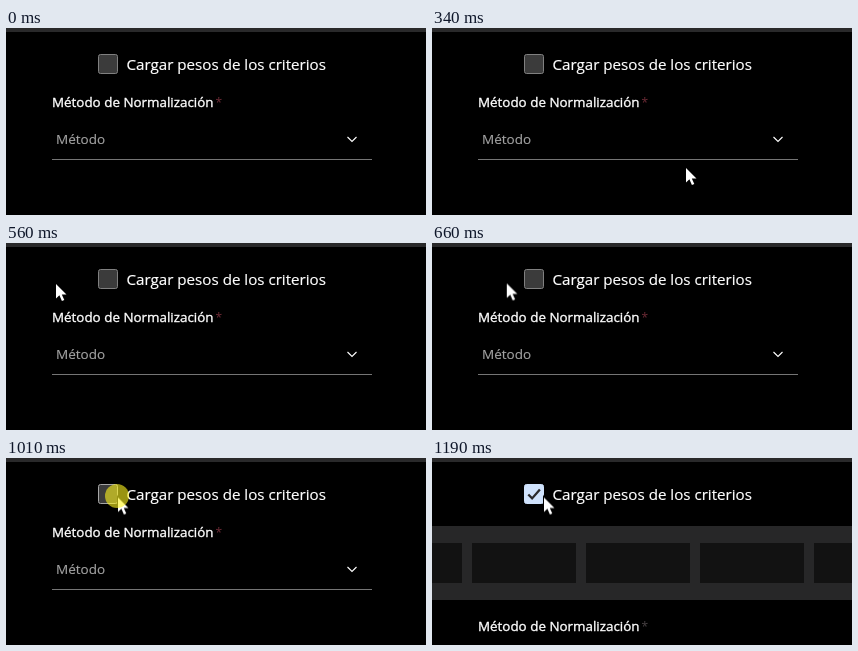
Recreate the animation shown at these times as an HTML page. Size 420 px wide and 187 px high, loop 2.42 s.

```html
<!DOCTYPE html>
<html lang="es">
<head>
<meta charset="utf-8">
<title>Cargar pesos de los criterios</title>
<style>
  html, body { margin: 0; width: 100%; height: 100%; overflow: hidden; background: #000; }
  svg { display: block; width: 420px; height: 187px; }
  text { font-family: "Open Sans", "Noto Sans", sans-serif; fill: #fff; }
  .title { font-size: 15.15px; stroke: #fff; stroke-width: .2px; }
  .label { font-size: 13.4px; stroke: #fff; stroke-width: .35px; }
  #star { fill: #6b2a34; font-size: 12px; }
  #hint { fill: #a3a3a3; font-size: 13.5px; stroke: #a3a3a3; stroke-width: .15px; }
  #panel, #tick, #click, #cursor { opacity: 0; }
</style>
</head>
<body>
<svg viewBox="0 0 420 187">
  <rect width="420" height="187"/>
  <rect width="420" height="4" fill="#29292a"/>

  <g id="panel">
    <rect y="68" width="420" height="74" fill="#272728"/>
    <g id="cells" fill="#121212"></g>
  </g>

  <g id="field">
    <text class="label" x="46" y="79">Método de Normalización</text>
    <text id="star" x="209.5" y="79">*</text>
    <text id="hint" x="50" y="116">Método</text>
    <path d="M341.5 109l4.5 4.5 4.5-4.5" fill="none" stroke="#fff" stroke-width="1.1"/>
    <rect x="46" y="131" width="320" height="1" fill="#757575"/>
  </g>

  <rect id="box" x="92.5" y="26.5" width="19" height="19" rx="2" fill="#3b3b3b" stroke="#808080"/>
  <path id="tick" d="M96.3 36.5l3.8 3.9 7.8-9" fill="none" stroke="#29292b" stroke-width="2.3"/>
  <text class="title" x="120.5" y="42">Cargar pesos de los criterios</text>

  <path id="cursor" d="M0 0V14.5L3.4 11.3 5.9 17 8.3 16 5.8 10.4H10.5Z"
        fill="#fff" stroke="#000" stroke-width="2" paint-order="stroke"/>
  <circle id="click" cx="111" cy="38" r="12" fill="#fff51e" fill-opacity=".6"/>
</svg>
<script>
const LOOP = 2420, ENTER = 180, HOVER = 720, PRESS = 1010, HELD = 1050, TOGGLE = 1190;
const $ = id => document.getElementById(id);

for (let x = -74; x < 420; x += 114) {
  const cell = document.createElementNS("http://www.w3.org/2000/svg", "rect");
  const attrs = { x, y: 85, width: 104, height: 40 };
  for (const name in attrs) cell.setAttribute(name, attrs[name]);
  $("cells").append(cell);
}

// Plays [time, style, count] entries; each moves to the next in count equal jumps.
function play(id, entries) {
  const frames = entries.map(([time, style, count = 1]) =>
    ({ ...style, offset: time / LOOP, easing: `steps(${count}, end)` }));
  frames.push({ ...entries.at(-1)[1], offset: 1 });
  const animation = $(id).animate(frames, { duration: LOOP, iterations: Infinity });
  animation.startTime = document.timeline.currentTime;
}

const show = { opacity: 1 }, hide = { opacity: 0 };
const at = (x, y) => ({ transform: `translate(${x}px, ${y}px)` });
const paint = (fill, stroke) => ({ fill, stroke });

play("cursor", [
  [0, { ...hide, ...at(353, 183) }],
  [ENTER, { ...show, ...at(353, 183) }, 4],
  [340, { ...show, ...at(254, 140) }, 2],
  [400, { ...show, ...at(75, 60) }, 2],
  [480, { ...show, ...at(47, 45) }, 2],
  [560, { ...show, ...at(50, 41) }, 5],
  [750, { ...show, ...at(112, 39.5) }]
]);
play("click", [[0, hide], [PRESS, show], [TOGGLE, hide]]);
play("box", [
  [0, paint("#3b3b3b", "#808080")],
  [HOVER, paint("#3b3b3b", "#a6a6a6")],
  [HELD, paint("#353536", "#6c6c6c")],
  [TOGGLE, paint("#cfe2fc", "#cfe2fc")]
]);
play("tick", [[0, hide], [TOGGLE, show]]);
play("panel", [[0, hide], [TOGGLE, show]]);
play("field", [[0, at(0, 0)], [TOGGLE, at(0, 94)]]);
play("star", [[0, { fill: "#6b2a34" }], [TOGGLE, { fill: "#474143" }]]);
</script>
</body>
</html>
```
